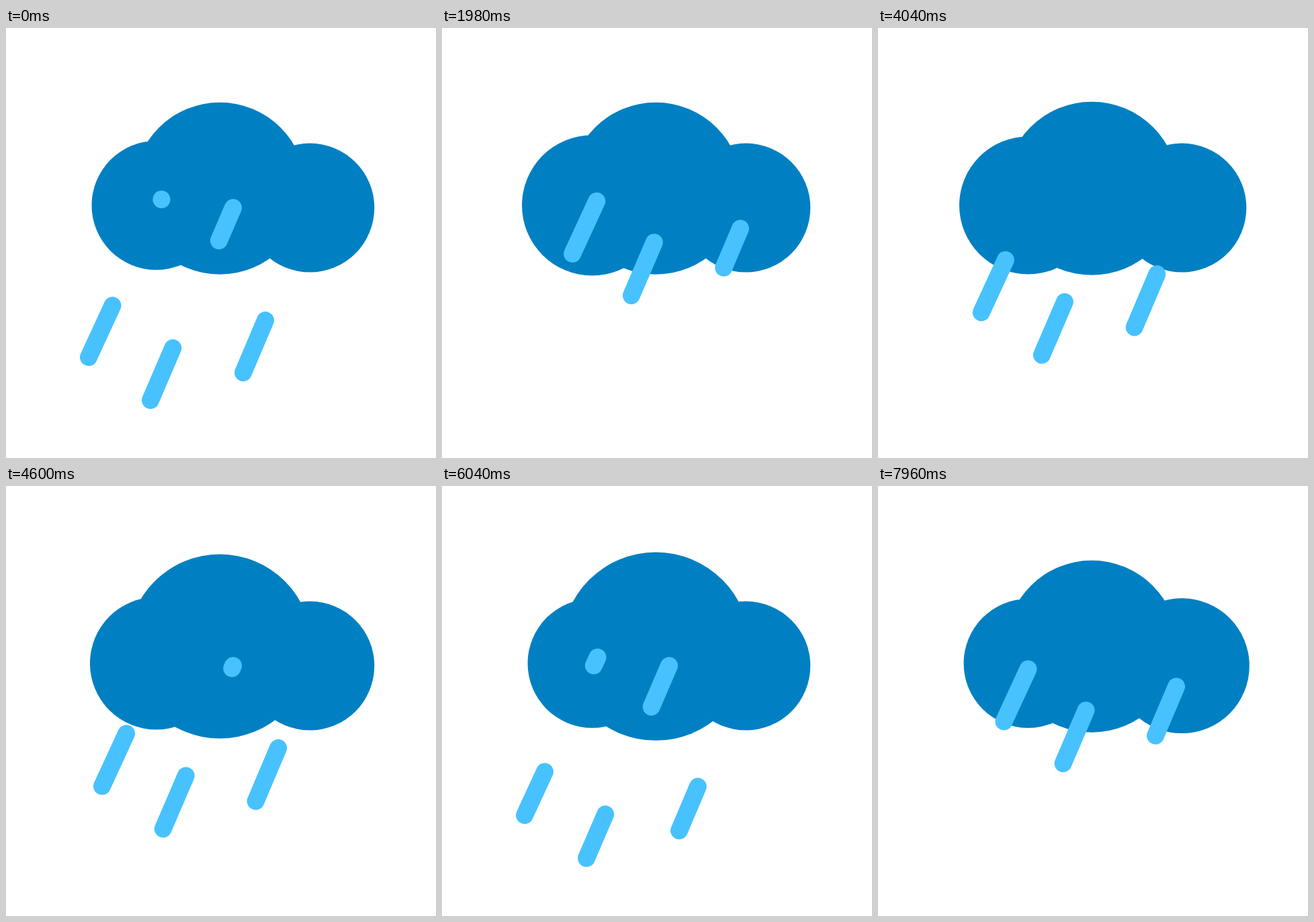
Write an HTML page that moves like this. It is 640 by 640 pixels and loops after 8 s.

```html
<!DOCTYPE html>
<html lang="en">
<head>
<meta charset="utf-8">
<title>Rain cloud</title>
<style>
  html, body { margin: 0; width: 100%; height: 100%; overflow: hidden; background: #fff; }
  svg { display: block; width: 100%; height: 100%; }
  .cloud { fill: #0080c2; }
  .rain { stroke: #47c2ff; stroke-width: 26; stroke-linecap: round; stroke-dasharray: 86 174; }
</style>
</head>
<body>
<svg viewBox="0 0 640 640">
  <g class="cloud">
    <circle id="left" cx="223.5" cy="264" r="96"/>
    <circle id="middle" cx="318.2" cy="238.7" r="128"/>
    <circle id="right" cx="452.3" cy="267.6" r="96"/>
  </g>
  <g class="rain">
    <line x1="231.5" y1="255" x2="123" y2="490"/>
    <line x1="338" y1="267.5" x2="215" y2="554"/>
    <line x1="444" y1="298.5" x2="353" y2="513"/>
  </g>
</svg>
<script>
const LOOP = 8000;
const BEAT = 560;
const STEPS = [0, 120, 260, 360, 460];
const RISE = 2800;
const FALL = 2600;
const FALL_EASE = 'cubic-bezier(.6, 0, .6, 1)';
const SOFT = 'cubic-bezier(.4, 0, .4, 1)';
const WINDUP = 'cubic-bezier(.7, -.65, .5, 1)'; // shrinks a little before growing

// the puff swells by a tenth and settles again
function swell(id, delay, easing) {
  const puff = document.getElementById(id);
  const size = puff.r.baseVal.value;
  const animation = puff.animate([
    { r: `${size}px`, easing },
    { r: `${size * 1.1}px`, offset: RISE / (RISE + FALL), easing: FALL_EASE },
    { r: `${size}px` }
  ], { delay, duration: RISE + FALL, fill: 'both' });
  animation.pause();
  return animation;
}

// dashes run down the line; head is the first dash's front end
function fall(line, head) {
  const animation = line.animate(
    { strokeDashoffset: [86 - head, 86 - head - 260] },
    { duration: 5670, iterations: Infinity }
  );
  animation.pause();
  return animation;
}

const heads = [0.2, 53.3, -25.6];
const lines = [...document.querySelectorAll('line')];
const parts = [
  swell('left', 0, SOFT),
  swell('middle', 2600, WINDUP),
  swell('right', 6180, WINDUP),
  ...lines.map((line, i) => fall(line, heads[i]))
];

// poses are held between uneven ticks
function held(t) {
  const phase = t % BEAT;
  return t - phase + Math.max(...STEPS.filter(s => s <= phase));
}

const start = performance.now();
function tick() {
  const t = held((performance.now() - start) % LOOP);
  for (const part of parts) part.currentTime = t;
  requestAnimationFrame(tick);
}
tick();
</script>
</body>
</html>
```
